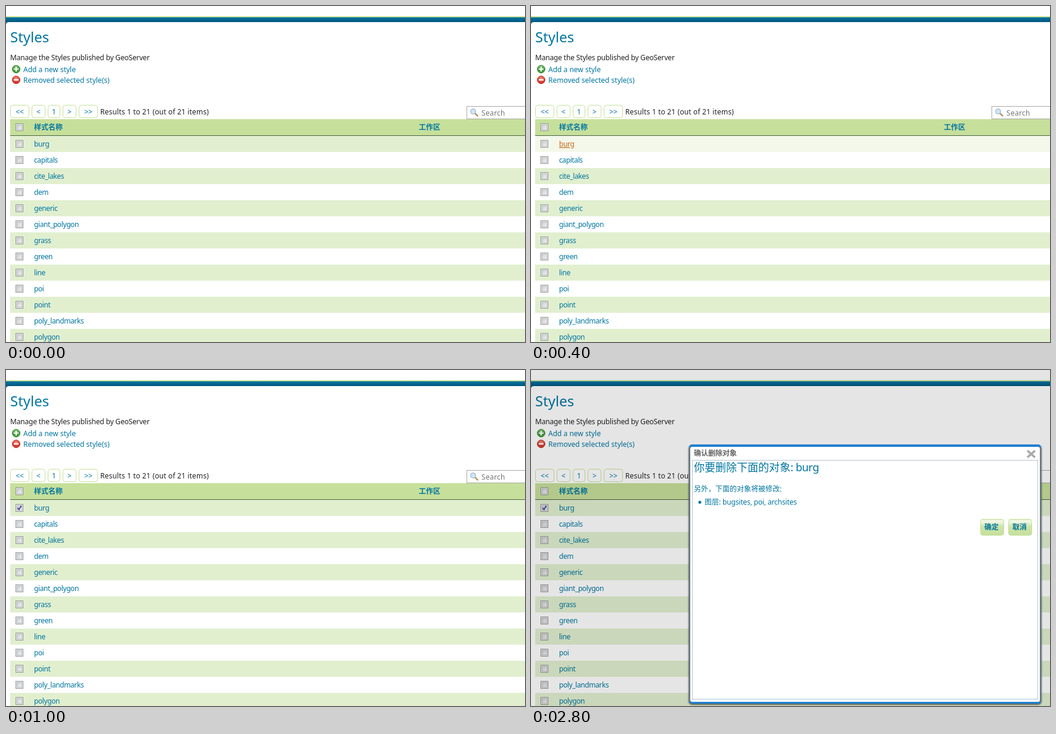
These frames come from a looping animation (870 by 564 pixels, 2900 ms). An HTML page:

```html
<!DOCTYPE html>
<html lang="en">
<head>
<meta charset="utf-8">
<title>Styles</title>
<style>
html, body { margin: 0; width: 100%; height: 100%; overflow: hidden; background: #fff; }
svg { display: block; width: 870px; height: 564px; }
text { font: 12px "Noto Sans", "Noto Sans CJK SC", "Noto Sans CJK", sans-serif; fill: #0076a1; white-space: pre; }
.title { font-size: 24px; }
.head { font-size: 18px; }
.bold { font-weight: bold; }
.plain { fill: #222; }
.tight { letter-spacing: -.4px; }
.snug { letter-spacing: -.17px; }
.loose { letter-spacing: .15px; }
.mid { text-anchor: middle; }
.over { fill: #c86a14; text-decoration: underline; }
.off { fill: #000; }
</style>
</head>
<body>
<svg id="stage" viewBox="0 0 870 564">
  <defs>
    <linearGradient id="bar" x2="0" y2="1"><stop stop-color="#0076a1"/><stop offset="1" stop-color="#00557d"/></linearGradient>
    <linearGradient id="box" x2="1" y2="1"><stop stop-color="#c9cdd2"/><stop offset="1" stop-color="#f5f5f5"/></linearGradient>
    <linearGradient id="boxOver" x2="1" y2="1"><stop stop-color="#a9d9f5"/><stop offset="1" stop-color="#eef9ff"/></linearGradient>
    <linearGradient id="boxDown" x2="1" y2="1"><stop stop-color="#7fbfe6"/><stop offset="1" stop-color="#d0ecfa"/></linearGradient>
    <linearGradient id="btn" x2="0" y2="1"><stop stop-color="#dcedc2"/><stop offset=".12" stop-color="#f3f9e9"/><stop offset=".45" stop-color="#cde4a8"/><stop offset="1" stop-color="#c6e09b"/></linearGradient>
    <radialGradient id="green" cy=".3"><stop stop-color="#8fce80"/><stop offset="1" stop-color="#43993c"/></radialGradient>
    <radialGradient id="red" cy=".3"><stop stop-color="#f4907f"/><stop offset="1" stop-color="#d23a30"/></radialGradient>
    <filter id="soft" x="-5%" y="-5%" width="110%" height="110%"><feGaussianBlur stdDeviation="1.2"/></filter>
  </defs>

  <rect width="870" height="564" fill="#fff"/>
  <rect y="17" width="870" height="2" fill="#c6e09b"/>
  <rect y="19" width="870" height="14" fill="#005a82"/>
  <rect y="19" width="870" height="8" fill="url(#bar)"/>
  <path d="M0 33V32Q0 27 5 27H870V33Z" fill="#fff"/>

  <text class="title" x="7" y="61">Styles</text>
  <text class="plain snug" x="7" y="91">Manage the Styles published by GeoServer</text>
  <circle cx="17" cy="106" r="6.5" fill="url(#green)" stroke="#47903f"/>
  <path d="M13 106h8M17 102v8" stroke="#fff" stroke-width="2"/>
  <text x="29" y="111">Add a new style</text>
  <circle cx="17" cy="124" r="6.5" fill="url(#red)" stroke="#bf3b32"/>
  <path d="M13 124h8" stroke="#fff" stroke-width="2.4"/>
  <text id="remove" x="29" y="129">Removed selected style(s)</text>

  <g id="pager"></g>
  <text class="plain loose" x="158" y="182">Results 1 to 21 (out of 21 items)</text>
  <rect x="772.5" y="168.5" width="110" height="21" fill="#fff" stroke="#aaa"/>
  <path d="M786.5 180.5l4 4" stroke="#b58750" stroke-width="2.4" stroke-linecap="round"/>
  <circle cx="783" cy="177" r="4.2" fill="#cfe6fa" stroke="#9db7d2" stroke-width="1.3"/>
  <text x="797" y="184" style="fill:#767676;letter-spacing:.3px">Search</text>

  <g id="table">
    <rect x="7" y="190" width="863" height="27" fill="#c6e09b"/>
    <rect x="7" y="217" width="863" height="1" fill="#4b6345"/>
    <text class="bold" x="47" y="208">样式名称</text>
    <text class="bold" x="692" y="208">工作区</text>
  </g>

  <g id="modal">
    <rect width="870" height="564" fill="#000" opacity=".1"/>
    <rect x="264" y="126" width="592" height="436" rx="6" fill="#333" opacity=".75" filter="url(#soft)"/>
    <rect x="265" y="125" width="590" height="435" rx="5" fill="#1f80d0"/>
    <rect x="265" y="130" width="590" height="426" fill="#66798a"/>
    <rect x="267" y="129" width="586" height="428" rx="3" fill="#fff"/>
    <rect x="270.5" y="151.5" width="579" height="401" fill="#fff" stroke="#b4c4d0"/>
    <text class="bold" x="273" y="144" style="fill:#636363">确认删除对象</text>
    <path d="M833.5 136.500l10 9M843.500 136.500l-10 9" stroke="#a9a9a9" stroke-width="3.6" stroke-linecap="square"/>
    <text class="head" x="273" y="170">你要删除下面的对象<tspan class="tight">: burg</tspan></text>
    <text x="273" y="204">另外，下面的对象将被修改:</text>
    <circle cx="283" cy="222" r="2.500" fill="#0076a1"/>
    <text x="291" y="226">图层<tspan class="snug">: bugsites, poi, archsites</tspan></text>
    <g id="buttons"></g>
  </g>
</svg>
<script>
const $ = id => document.getElementById(id);

function add(parent, tag, attrs, text = '') {
  const node = document.createElementNS('http://www.w3.org/2000/svg', tag);
  for (const key in attrs) node.setAttribute(key, attrs[key]);
  node.textContent = text;
  return parent.appendChild(node);
}

function checkbox(y) {
  const g = add($('table'), 'g', { transform: `translate(16 ${y})` });
  const frame = add(g, 'rect', { x: .5, y: .5, width: 12, height: 12, fill: '#f4f4f4', stroke: '#8e8f8f' });
  const face = add(g, 'rect', { x: 2.5, y: 2.5, width: 8, height: 8, fill: 'url(#box)', stroke: '#b6babf' });
  const tick = add(g, 'path', { d: 'M3.6 6.4L5.700 9.300L9.700 2.900', fill: 'none', stroke: '#45489a', 'stroke-width': 2, visibility: 'hidden' });
  return { frame, face, tick };
}

[['<<', 7, 32], ['<', 43, 23], ['1', 70, 21], ['>', 95, 23], ['>>', 122, 32]].forEach(([label, x, w]) => {
  add($('pager'), 'rect', { x: x + .5, y: 166.5, width: w - 1, height: 21, rx: 4, fill: '#fff', stroke: '#c6e09b' });
  add($('pager'), 'text', { class: 'mid', x: x + w / 2, y: 182 }, label);
});

[['确定', 753], ['取消', 800]].forEach(([label, x]) => {
  add($('buttons'), 'rect', { x: x + .5, y: 250.5, width: 39, height: 27, rx: 4, fill: 'url(#btn)', stroke: '#c6e09b' });
  add($('buttons'), 'text', { class: 'bold mid', x: x + 19, y: 268 }, label);
});

checkbox(197);
const names = 'burg capitals cite_lakes dem generic giant_polygon grass green line poi point poly_landmarks polygon';
const rows = names.split(' ').map((name, i) => {
  const y = 218 + i * 27;
  const color = i % 2 ? '#fff' : '#e1efcf';
  const back = add($('table'), 'rect', { x: 7, y, width: 863, height: 27, fill: color });
  const link = add($('table'), 'text', { class: 'tight', x: 47, y: y + 18 }, name);
  return { back, link, color, box: checkbox(y + 7) };
});

const looks = {
  rest: ['#8e8f8f', '#f4f4f4', 'url(#box)', '#b6babf', '#45489a'],
  over: ['#3c7fb1', '#def3fd', 'url(#boxOver)', '#8cc5e8', '#0a1c66'],
  down: ['#2c628b', '#c2e4f6', 'url(#boxDown)', '#5e9fc8', '#0a1c66']
};

// Each step starts at `at` ms and lists what differs from the resting page.
const steps = [
  { at: 0 },
  { at: 100, row: 0 },
  { at: 200, row: 2 },
  { at: 400, row: 0, link: true },
  { at: 500, row: 0 },
  { at: 600, row: 0, box: 'over' },
  { at: 800, row: 0, box: 'down' },
  { at: 900, row: 0, box: 'over', checked: true },
  { at: 1000, checked: true },
  { at: 1200, checked: true, remove: 'over' },
  { at: 1700, checked: true, remove: 'off', modal: true },
  { at: 2800, checked: true, modal: true }
];
const LOOP = 2900;

function show({ row = -1, link, box = 'rest', checked, remove = '', modal }) {
  rows.forEach((r, i) => r.back.setAttribute('fill', i === row ? '#f4f8ea' : r.color));
  const first = rows[0];
  first.link.setAttribute('class', link ? 'tight over' : 'tight');
  const [edge, fill, face, inner, ink] = looks[box];
  first.box.frame.setAttribute('stroke', edge);
  first.box.frame.setAttribute('fill', fill);
  first.box.face.setAttribute('fill', face);
  first.box.face.setAttribute('stroke', inner);
  first.box.tick.setAttribute('stroke', ink);
  first.box.tick.setAttribute('visibility', checked ? 'visible' : 'hidden');
  $('remove').setAttribute('class', remove);
  $('modal').setAttribute('display', modal ? 'inline' : 'none');
}

let current;
const start = performance.now();
function tick() {
  const t = (performance.now() - start) % LOOP;
  const step = steps.findLast(s => s.at <= t);
  if (step !== current) show(current = step);
  requestAnimationFrame(tick);
}
tick();
</script>
</body>
</html>
```
